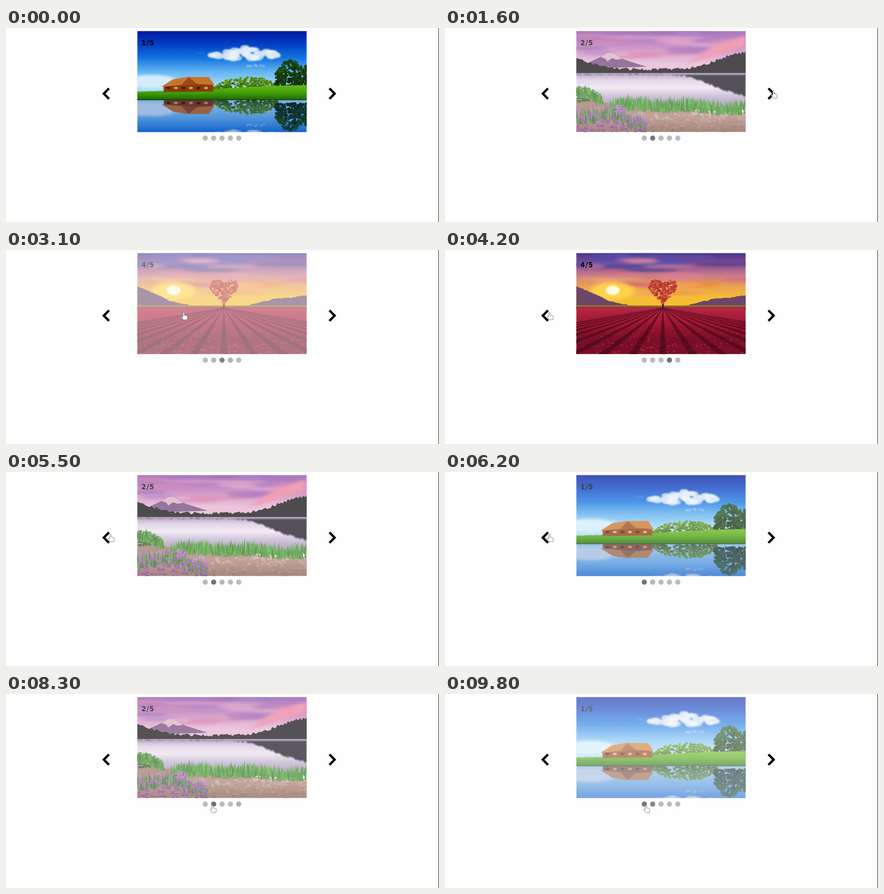
An HTML page that plays this animation: 750x337 px, repeating every 9900 ms.

```html
<!DOCTYPE html>
<html lang="en">
<head>
<meta charset="utf-8">
<title>Slideshow</title>
<style>
html, body { margin: 0; width: 100%; height: 100%; overflow: hidden; background: #fefefe; }
svg { display: block; width: 750px; height: 337px; }
text { font: bold 11.5px "DejaVu Sans", sans-serif; letter-spacing: .8px; }
</style>
</head>
<body>
<svg id="stage" viewBox="0 0 750 337" xmlns="http://www.w3.org/2000/svg"></svg>
<script>
const LOOP = 9900, FADE = 1500, DOT_FADE = 600, FAINT = .55;
const W = 293.5, H = 175.5;
const stage = document.getElementById('stage');

let seed = 7;
const rnd = () => (seed = (seed * 16807) % 2147483647) / 2147483647;
const span = (a, b) => a + (b - a) * rnd();
const many = (n, fn) => Array.from({ length: n }, (_, i) => fn(i)).join('');

// Height at k (0..1) along a list of evenly spaced heights
function at(heights, k) {
  const p = k * (heights.length - 1), i = Math.min(Math.floor(p), heights.length - 2);
  return i < 0 ? heights[0] : heights[i] + (heights[i + 1] - heights[i]) * (p - i);
}

let defs = '';
function gradient(...colors) {
  const id = 'g' + defs.length;
  defs += `<linearGradient id="${id}" x2="0" y2="1">` + colors.map((c, i) =>
    `<stop offset="${i / (colors.length - 1)}" stop-color="${c}"/>`).join('') + '</linearGradient>';
  return `url(#${id})`;
}

const soft = 'filter="url(#soft)"', haze = 'filter="url(#haze)"';
const band = (y, h, ...colors) => `<rect y="${y}" width="${W}" height="${h}" fill="${gradient(...colors, colors.at(-1))}"/>`;
const poly = (pts, fill, more = '') => `<polygon points="${pts}" fill="${fill}" ${more}/>`;
const oval = (x, y, rx, ry, fill, more = '') =>
  `<ellipse cx="${x.toFixed(1)}" cy="${y.toFixed(1)}" rx="${rx.toFixed(1)}" ry="${ry.toFixed(1)}" fill="${fill}" ${more}/>`;
const hsl = (h, s, l) => `hsl(${h} ${s}% ${l.toFixed(0)}%)`;

function hill(heights, base, fill, rough = .8, more = '') {
  const ridge = many(99, i => `${i * 3},${(at(heights, i / 98) + span(-rough, rough)).toFixed(1)} `);
  return poly(`${ridge} 294,${base} 0,${base}`, fill, more);
}
// Specks of one hue, lighter near the top
const foliage = (n, x0, x1, tops, bottoms, r, h, s, l) => many(n, () => {
  const k = rnd(), v = rnd(), top = at(tops, k);
  return oval(x0 + (x1 - x0) * k, top + (at(bottoms, k) - top) * v, span(r * .5, r), span(r * .4, r * .8),
    hsl(h, s, Math.max(3, l * (1.25 - .5 * v) + span(-5, 5))));
});
const grass = (n, x0, x1, tops, depth, h, s, l) => many(n, () => {
  const k = rnd(), x = x0 + (x1 - x0) * k, y = at(tops, k) + depth * span(.5, 1);
  return poly(`${x - 1.5},${y} ${x + span(-3, 3)},${y - depth * span(.4, .8)} ${x + 1.5},${y}`, hsl(h, s, l + span(-9, 9)));
});
const cloud = (n, x, y, w, h, h0, s, l) => `<g ${soft}>` + many(n, () => {
  const a = span(-1, 1), room = 1 - a * a;
  return oval(x + w * a, y + h * room * span(-1, .6), w * .14, h * .35, hsl(h0, s, l + span(-5, 5)), 'opacity=".8"');
}) + '</g>';
const streaks = (n, y0, y1, h, s, l) => `<g ${haze}>` + many(n, () =>
  oval(span(0, W), span(y0, y1), span(20, 60), span(2, 4), hsl(h, s, l + span(-8, 8)), 'opacity=".7"')) + '</g>';

function cottage() {
  const house = poly('46,94 75,89 131,90 132,105 46,106', '#8a3a0c') +
    poly('42,97 62,84 74,82 86,80 124,80 134,94 104,92 73,94', '#c8752c') +
    poly('77,93 89,80 105,93', '#9a4a18') +
    many(6, i => `<rect x="${51 + i * 13}" y="97" width="6" height="4" fill="${i % 2 ? '#e0a050' : '#3c1a0c'}"/>`);
  const view = band(0, 118, '#0018a0', '#0440c4', '#1474e0', '#64b4f2', '#a4dcfa') +
    oval(25, 88, 45, 12, '#d4ecfc', haze) +
    cloud(60, 188, 42, 58, 13, 210, 60, 92) + cloud(8, 206, 61, 16, 3, 210, 60, 88) + cloud(4, 110, 38, 5, 2, 210, 70, 85) +
    foliage(300, 130, 244, [98, 83, 80, 82, 92], [103, 104], 3, 88, 75, 27) +
    foliage(330, 240, 297, [74, 54, 50, 58, 62], [98, 99], 3.5, 112, 55, 15) + house;
  return view + `<g clip-path="url(#pond)"><g transform="translate(0 224) scale(1 -1)">${view}</g>` +
    `<rect y="119" width="${W}" height="57" fill="#002a90" opacity=".25"/></g>` +
    hill([105, 104, 102, 98, 95, 94], 120, gradient('#68b814', '#44a008', '#1c6404'), .4) + house +
    '<path d="M0 119.500H294" stroke="#0c3018"/>';
}

function lake() {
  return band(0, 75, '#8a4cab', '#a860b0', '#d088bc', '#e6b4d0') +
    streaks(14, 5, 45, 330, 55, 68) + streaks(7, 0, 40, 278, 40, 50) +
    poly('190,58 240,24 294,8 294,26 240,42', '#ec7f9c', haze) +
    poly('0,66 42,45 54,38 64,38 84,50 122,62', '#74487c') +
    poly('42,45 54,38 64,38 80,48 70,50 62,47 54,53 50,48', '#dcaec2') +
    hill([46, 58, 65, 66, 67, 66, 64, 56, 44, 36], 76, '#141014', 2.5) +
    band(73, 64, '#a488b4', '#dccde2', '#efe4f0', '#c4b6d2', '#a898b8') +
    hill([76, 76, 76, 76, 76, 76, 79, 92, 104, 114], 76, '#1e1820', 2, soft) +
    hill([120, 124, 130, 133, 138, 142, 144], H, gradient('#9c7466', '#b08478', '#84604e')) +
    foliage(150, 60, W, [142, 144], [176, 174], 4, 12, 22, 55) +
    foliage(100, 0, 44, [97, 99, 112], [122, 122], 3, 105, 45, 32) +
    grass(160, 0, 46, [96, 100, 112], 20, 105, 50, 36) +
    grass(520, 60, W, [116, 114, 118, 116, 122, 121], 25, 108, 52, 37) +
    grass(150, 0, 120, [133, 130, 150], 30, 108, 40, 34) +
    foliage(190, 0, 122, [134, 132, 128, 150], [176, 176], 2.6, 286, 55, 50);
}

function valley() {
  return band(0, 100, '#3c8cd0', '#8cc0e6', '#e3eff4') + cloud(40, 110, 28, 80, 10, 205, 40, 94) +
    hill([70, 44, 60, 30, 58, 42, 78], 110, '#62788c', 1.5) + band(98, 78, '#749b36', '#355f1c') +
    foliage(260, 0, W, [88, 92, 85, 92], [106, 106], 4, 50, 55, 32);
}

function tulips() {
  const sunset = band(0, 97, '#45318c', '#8a4c94', '#c87a86', '#eca050', '#f4be30') +
    streaks(14, 2, 32, 240, 40, 45) + streaks(14, 12, 60, 345, 55, 64) + streaks(8, 40, 75, 28, 85, 62) +
    oval(63, 66, 38, 15, '#ffd24a', haze) + oval(63, 65, 12, 8, '#fffbe0', soft);
  const furrows = many(19, i => {
    const x = 150 + (i - 9) * 52, w = 6 + Math.abs(i - 9);
    return poly(`149.500,95 150.500,95 ${x + w},176 ${x - w},176`, '#4c0818', 'opacity=".75"');
  });
  const petals = many(700, () => {
    const d = rnd() ** 1.5, r = .5 + d * 1.6;
    return oval(span(0, W), 96 + 80 * d, r, r * .6, hsl(350, 65, span(24, 54)), 'opacity=".6"');
  });
  const crown = many(330, () => {
    const a = span(0, 2 * Math.PI), s = Math.sqrt(rnd()) * 1.5;
    const y = 13 * Math.cos(a) - 5 * Math.cos(2 * a) - 2 * Math.cos(3 * a);
    return oval(150 + s * 16 * Math.sin(a) ** 3, 64 - s * y, 2, 1.6, hsl(6, 60, span(36, 56)));
  });
  return sunset + hill([58, 70, 84, 90, 93, 94, 94, 88, 80, 78, 73], 98, '#6a4468') +
    band(91, 6, '#b8862c', '#7c4424') + band(95, 81, '#b42444', '#a01430', '#780c24') + petals + furrows +
    poly('148.500,96 149,70 151,70 152,96', '#4a1a1c') + crown;
}

function fjord() {
  const left = [18, 43, 58, 96, 106, 106, 106], right = [106, 106, 106, 98, 58, 22, 3];
  return band(0, 106, '#64b8e4', '#bfe3f5', '#eef8fc') +
    cloud(60, 130, 28, 100, 20, 200, 50, 97) +
    hill([106, 106, 98, 70, 84, 92, 92], 106, '#6c9cb4') +
    hill(right, 106, gradient('#4a94bc', '#2c74a0', '#2a6c80'), 1.5) +
    many(12, i => poly(`${190 + i * 9},${62 - i * 4} ${215 + i * 9},${66 - i * 3} ${175 + i * 10},${92 - i}`, '#1c5c8c', 'opacity=".3"')) +
    poly('268,13 294,2 294,10 258,26', '#e2f0f6', soft) +
    hill(left, 106, '#8c8e70', 1.5) + foliage(330, 0, 147, left.slice(0, 4), [103, 103], 4.5, 60, 20, 50) +
    foliage(140, 0, 147, [82, 92, 98], [106, 106], 3, 95, 38, 32) +
    band(99, 77, '#7ccad4', '#34b2c2', '#20a8ba', '#1cb0c2') +
    hill([150, 134, 118, 108, 108, 108, 108].map(y => y + 6), 103, '#348c84', 1, soft) +
    hill([103, 103, 103, 103, 126, 150, 176], 103, '#34909a', 1, soft) +
    poly('20,164 60,142 120,128 165,118 185,126 120,146 40,170', '#94dae6', haze) + oval(205, 164, 30, 9, '#8cd6e4', haze) +
    foliage(230, 160, W, [97, 92, 94, 88, 74], [105, 110, 116], 4, 98, 42, 32) +
    foliage(90, 44, 99, [115, 102, 108, 115], [119, 122], 3, 70, 38, 42) +
    foliage(50, 136, 174, [118, 112, 112, 118], [122, 126], 2.5, 65, 35, 45);
}

const scenes = [cottage, lake, valley, tulips, fjord].map((draw, i) => `<g class="slide">
<g transform="translate(227.300 5.200)" clip-path="url(#frame)">${draw()}</g><text x="234.500" y="30">${i + 1}/5</text></g>`).join('');
const chevron = (x, d) => `<path d="M${x} 104.800l${d} 9.200l${-d} 9.200" fill="none" stroke="#000" stroke-width="4"/>`;
const dotX = i => 345.2 + i * 14.5;
const outline = 'fill="#fff" stroke="#666" stroke-width=".7" stroke-linejoin="round"';

stage.innerHTML = `<defs>${defs}
<clipPath id="frame"><rect width="${W}" height="${H}"/></clipPath>
<clipPath id="pond"><rect y="119" width="${W}" height="57"/></clipPath>
<filter id="soft" x="-30%" y="-50%" width="160%" height="200%"><feGaussianBlur stdDeviation="1"/></filter>
<filter id="haze" x="-50%" y="-150%" width="200%" height="400%"><feGaussianBlur stdDeviation="5 2"/></filter></defs>
<rect width="750" height="337" fill="#fefefe"/>${scenes}
${chevron(178.4, -9)}${chevron(560.2, 9)}
${many(5, i => `<circle class="dot" cx="${dotX(i)}" cy="191.300" r="4.500"/>`)}
<path d="M749.500 0V337" stroke="#444"/>
<g id="cursor">
<path d="M-1.200 1Q0-.8 1.200 1V5L5.500 6Q7 6.500 6.500 9L6 13H-.7L-4 7.700Q-4 6-1.200 7.800Z" ${outline}/>
<path d="M0 0V10L2.300 8L4 11.700L5.600 11L4 7.300H7Z" ${outline}/>
</g>`;

const slides = [...stage.querySelectorAll('.slide')];
const dots = [...stage.querySelectorAll('.dot')];
const cursor = stage.querySelector('#cursor');
const [hand, arrow] = cursor.children;

// [time, slide]
const clicks = [[1200, 1], [2700, 2], [3030, 3], [4600, 2], [5100, 1], [5800, 0], [6500, 4], [7950, 1], [9680, 0]];
// [dot, on, off]
const lit = clicks.map(([t, i], n) => [i, t, n + 1 < clicks.length ? clicks[n + 1][0] : LOOP])
  .concat([[1, 7250, 9350], [0, 9400, LOOP]]);

// The pointer leaves one spot for the next: [leave, arrive, x, y]
const next = [569, 109], prev = [181, 108], onDot = i => [dotX(i) - 2 + 5 * (i < 1), 193];
const trips = [[200, 400, ...next], [3000, 3150, ...prev], [6800, 7200, ...onDot(1)], [9300, 9400, ...onDot(0)]];
const entry = [548, 240];

// cubic-bezier(.25, .1, .25, 1)
function ease(x) {
  if (x <= 0) return 0;
  if (x >= 1) return 1;
  const curve = (a, b, u) => 3 * a * u * (1 - u) ** 2 + 3 * b * u * u * (1 - u) + u ** 3;
  let lo = 0, hi = 1;
  for (let i = 0; i < 20; i++) {
    const mid = (lo + hi) / 2;
    if (curve(.25, .25, mid) < x) lo = mid; else hi = mid;
  }
  return curve(.1, 1, lo);
}

const glow = (t, on, off) => ease((Math.min(t, off) - on) / DOT_FADE) * (1 - ease((t - off) / DOT_FADE));

function movePointer(t) {
  const n = trips.findLastIndex(p => p[0] <= t);
  cursor.style.display = n < 0 ? 'none' : '';
  if (n < 0) return;
  const [leave, arrive, x, y] = trips[n], [x0, y0] = n ? trips[n - 1].slice(2) : entry;
  const k = Math.min(1, (t - leave) / (arrive - leave));
  const pointing = k === 1 || n === 1;
  cursor.setAttribute('transform', `translate(${x0 + (x - x0) * k} ${y0 + (y - y0) * k})`);
  hand.style.display = pointing ? '' : 'none';
  arrow.style.display = pointing ? 'none' : '';
}

function render(t) {
  const [start, current] = clicks.findLast(c => c[0] <= t) || [-FADE, 0];
  slides.forEach((s, i) => {
    s.style.display = i === current ? '' : 'none';
    if (i === current) s.setAttribute('opacity', FAINT + (1 - FAINT) * ease((t - start) / FADE));
  });
  dots.forEach((d, i) => {
    const level = Math.max(0, ...lit.filter(l => l[0] === i).map(l => glow(t, l[1], l[2])));
    const v = Math.round(187 - 74 * level);
    d.setAttribute('fill', `rgb(${v},${v},${v})`);
  });
  movePointer(t);
}

const begin = performance.now();
function tick() {
  render((performance.now() - begin) % LOOP);
  requestAnimationFrame(tick);
}
tick();
</script>
</body>
</html>
```
